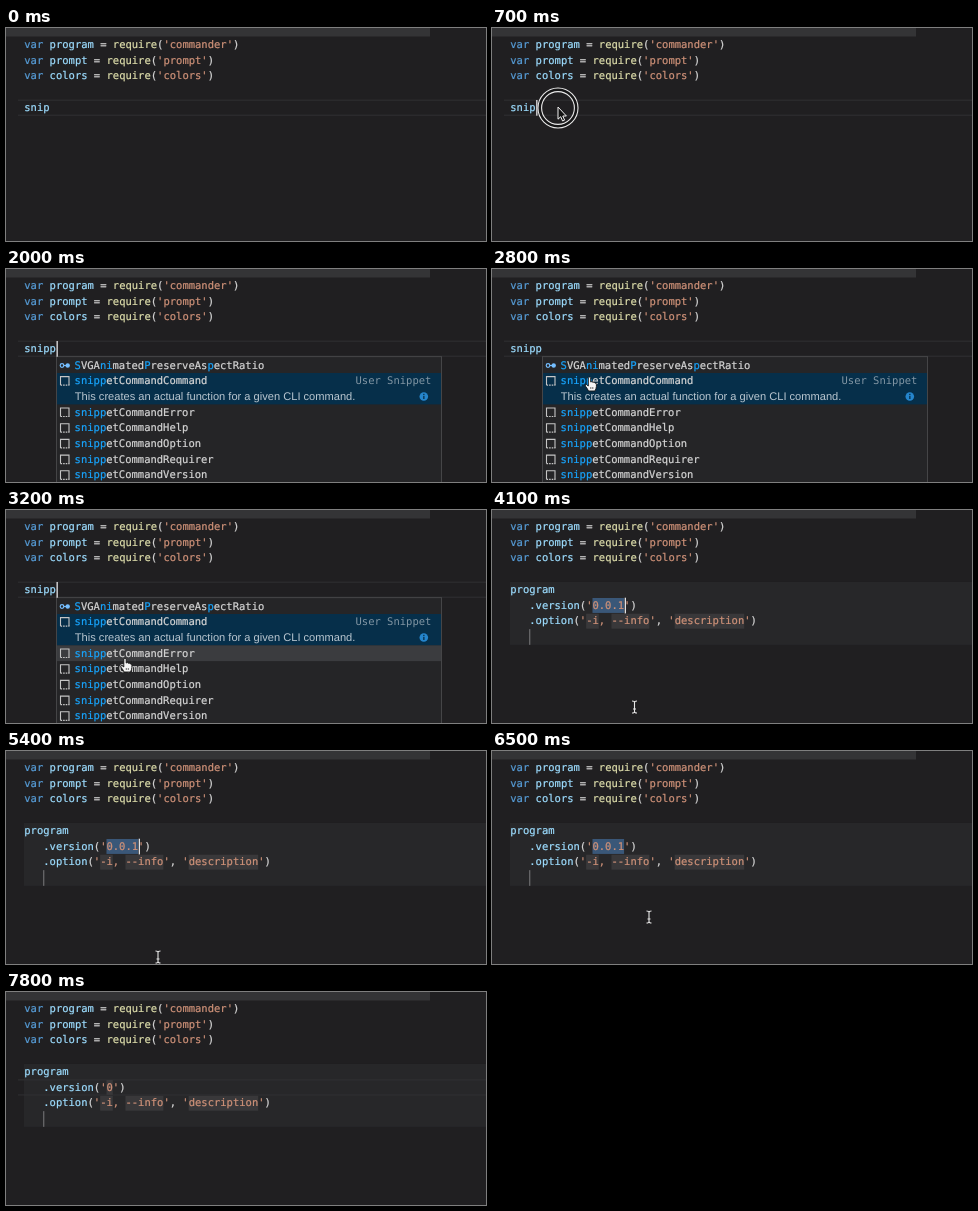
Recreate the animation shown at these times as an HTML page. Size 480 by 213 pixels, loop 8 s.

```html
<!DOCTYPE html>
<html lang="en">
<head>
<meta charset="utf-8">
<title>Snippet completion</title>
<style>
  html, body { margin: 0; width: 100%; height: 100%; overflow: hidden; background: #201f21; }
  svg { display: block; width: 480px; height: 213px; }
  text {
    font: 10.5px "DejaVu Sans Mono", monospace;
    white-space: pre;
    text-rendering: geometricPrecision;
    fill: #d4d4d4;
    stroke-width: .22px;
  }
  .detail { font: 11.1px "Liberation Sans", Arial, sans-serif; fill: #b9c6d0; }
  .muted { fill: #8296a4; }
  .kw { fill: #569cd6; stroke: #569cd6; }
  .id { fill: #9cdcfe; stroke: #9cdcfe; }
  .fn { fill: #dcdcaa; stroke: #dcdcaa; }
  .str { fill: #ce9178; stroke: #ce9178; }
  .pt { fill: #d4d4d4; stroke: #d4d4d4; }
  .hit { fill: #18a3fb; stroke: #18a3fb; }
</style>
</head>
<body>
<svg id="stage" viewBox="0 0 480 213"></svg>
<script>
const LOOP = 8000, STEP = 100;
const LEFT = 18.3, CHAR = 6.3215, TOP = 9.1, ROW = 15.72;
const stage = document.getElementById('stage');

function add(parent, tag, attrs = {}, content = '') {
  const node = document.createElementNS('http://www.w3.org/2000/svg', tag);
  for (const key in attrs) node.setAttribute(key, attrs[key]);
  node.textContent = content;
  parent.appendChild(node);
  return node;
}
const group = (parent = stage) => add(parent, 'g');
const rect = (parent, x, y, width, height, fill) =>
  add(parent, 'rect', { x, y, width, height, fill });
const show = (node, on) => node.setAttribute('visibility', on ? 'visible' : 'hidden');
const colX = col => LEFT + col * CHAR;
const rowY = row => TOP + row * ROW;

// Runs are [class, text] pairs set one after another on a single line.
function runs(parent, x, y, parts) {
  const line = add(parent, 'text', { x, y });
  for (const [kind, text] of parts) add(line, 'tspan', { class: kind }, text);
}
const code = (parent, row, col, parts) => runs(parent, colX(col), rowY(row) + 10.9, parts);

function currentLine(parent, row) {
  rect(parent, 12, rowY(row) - .3, 468, 1, '#303032');
  rect(parent, 12, rowY(row) + ROW - 1, 468, 1, '#303032');
}

// Window and code that never changes
rect(stage, 0, 0, 480, 213, '#201f21');
rect(stage, 0, 0, 424, 8.5, '#343436');

const requires = [['program', 'commander'], ['prompt', 'prompt'], ['colors', 'colors']];
requires.forEach(([name, lib], row) => code(stage, row, 0, [
  ['kw', 'var '], ['id', name], ['pt', ' = '], ['fn', 'require'],
  ['pt', '('], ['str', `'${lib}'`], ['pt', ')']
]));

// The word being typed
const typing = group();
currentLine(typing, 4);
code(typing, 4, 0, [['id', 'snip']]);
const extraP = group();
code(extraP, 4, 4, [['id', 'p']]);

// The inserted snippet
const snippet = group();
rect(snippet, 18, rowY(4), 462, ROW * 4, '#272729');
const mark = (parent, row, col, length, fill = '#39383a') =>
  rect(parent, colX(col), rowY(row) + .3, length * CHAR, ROW - .8, fill);
mark(snippet, 6, 12, 2);
mark(snippet, 6, 16, 6);
mark(snippet, 6, 26, 11);
code(snippet, 4, 0, [['id', 'program']]);
code(snippet, 6, 3, [
  ['id', '.option'], ['pt', '('], ['str', "'-i, --info'"], ['pt', ', '],
  ['str', "'description'"], ['pt', ')']
]);
rect(snippet, colX(3), rowY(7), 1, ROW, '#7b7b7d');

function versionLine(value, selected) {
  const g = group();
  if (!selected) currentLine(g, 5);
  mark(g, 5, 13, value.length, selected ? '#3a5778' : '#39383a');
  code(g, 5, 3, [['id', '.version'], ['pt', '('], ['str', `'${value}'`], ['pt', ')']]);
  return g;
}
const fullVersion = versionLine('0.0.1', true);
const newVersion = versionLine('0', false);

// Completion list
const popup = group();
const ITEM = 15.7, LIST = 87.6;
const itemY = slot => LIST + .7 + slot * ITEM;
add(popup, 'rect', { x: 50.5, y: LIST, width: 385, height: 140, fill: '#252527', stroke: '#454547' });
rect(popup, 51, itemY(1), 384, ITEM * 2, '#062f4a');
const hover = rect(popup, 51, 0, 384, ITEM, '#3b3c3f');

const label = (slot, parts) => runs(popup, 68.6, itemY(slot) + 11.2, parts);
label(0, [
  ['hit', 'S'], ['pt', 'VGA'], ['hit', 'ni'], ['pt', 'mated'], ['hit', 'P'],
  ['pt', 'reserveAs'], ['hit', 'p'], ['pt', 'ectRatio']
]);
add(popup, 'circle', { cx: 56, cy: 96.5, r: 1.8, fill: 'none', stroke: '#75beff', 'stroke-width': 1.2 });
add(popup, 'path', { d: 'M57.8 96.5H60', stroke: '#75beff', 'stroke-width': 1.2 });
add(popup, 'circle', { cx: 61.7, cy: 96.5, r: 2.2, fill: '#75beff' });

const commands = { 1: 'Command', 3: 'Error', 4: 'Help', 5: 'Option', 6: 'Requirer', 7: 'Version' };
for (const slot in commands) {
  const y = itemY(+slot) + 3.6;
  add(popup, 'path', {
    d: `M54.5 ${y + 8.5}V${y}H63V${y + 8.5}`, fill: 'none', stroke: '#c5c5c5', 'stroke-width': 1.1
  });
  add(popup, 'path', {
    d: `M54.5 ${y + 8.5}H63.5`, stroke: '#c5c5c5', 'stroke-width': 1.2, 'stroke-dasharray': '1.6 1'
  });
  label(+slot, [['hit', 'snipp'], ['pt', 'etCommand' + commands[slot]]]);
}
add(popup, 'text', { x: 349.5, y: itemY(1) + 11.2, class: 'muted' }, 'User Snippet');
add(popup, 'text', { x: 68.8, y: 131, class: 'detail' },
  'This creates an actual function for a given CLI command.');
add(popup, 'circle', { cx: 417.8, cy: 127.5, r: 4.3, fill: '#2585cc' });
rect(popup, 417.2, 126.8, 1.3, 3.2, '#062f4a');
rect(popup, 417.2, 124.8, 1.3, 1.2, '#062f4a');

const caret = rect(stage, 0, 0, 1.3, ROW, '#e4e4e6');

// Pointers, each drawn around its hot spot
const pointer = group();
const ring = group(pointer);
for (const [r, stroke, width] of [[18.2, '#151516', 3.6], [20, '#e8e8e8', 1.1], [16.4, '#e8e8e8', 1.1]])
  add(ring, 'circle', { r, fill: 'none', stroke, 'stroke-width': width });

const arrow = group(pointer);
add(arrow, 'path', {
  d: 'M0 -1V11.2L2.7 8.7L4.6 13L6.6 12.1L4.8 8H8.4Z',
  fill: '#111', stroke: '#f2f2f2', 'stroke-width': 1
});
const hand = group(pointer);
add(hand, 'path', {
  d: 'M-1.2 1Q0 -1 1.2 1V5Q2.6 4 3.4 5.3Q4.8 4.6 5.4 6Q7 5.8 6.9 7.6V9.5Q6.7 11.5 5.5 14H-1Q-2 11.5-4.2 9Q-4.6 7.4-3.2 7.4L-1.2 9Z',
  fill: '#f4f4f4', stroke: '#161616', 'stroke-width': .9
});
add(hand, 'path', { d: 'M1.3 10V12M3.3 10V12', stroke: '#333', 'stroke-width': .7 });
const beam = group(pointer);
add(beam, 'path', {
  d: 'M-2.5 -6Q0 -6 0 -4.5Q0 -6 2.5 -6M0 -4.5V4.5M-2.5 6Q0 6 0 4.5Q0 6 2.5 6M-1.5 2H1.5',
  fill: 'none', stroke: '#e6e6e6', 'stroke-width': 1.1
});

// Pointer stops: time, x, y
const path = [
  [100, 78, 106], [300, 66, 80], [2200, 66, 80], [2800, 97.5, 108], [3200, 119, 148],
  [3600, 142, 194], [4000, 142, 194], [4200, 143, 200], [5300, 143, 200], [5400, 152, 206],
  [5700, 188, 200], [6100, 157, 166]
];
function pointerAt(t) {
  const next = path.findIndex(stop => stop[0] > t);
  if (next === 0) return path[0].slice(1);
  if (next < 0) return path[path.length - 1].slice(1);
  const [t0, x0, y0] = path[next - 1], [t1, x1, y1] = path[next];
  const k = (t - t0) / (t1 - t0);
  return [x0 + (x1 - x0) * k, y0 + (y1 - y0) * k];
}

const within = (t, from, to) => t >= from && t < to;

// Caret stays on after each of these edits: time, column, row
const edits = [[700, 4, 4], [1900, 5, 4], [4000, 18, 5], [7300, 14, 5]];
function drawCaret(t) {
  const [start, col, row] = edits.filter(edit => edit[0] <= t).pop() || [200, 4, 4];
  show(caret, t >= start && Math.floor((t - start) / 500) % 2 === 0);
  caret.setAttribute('x', colX(col) + .6);
  caret.setAttribute('y', rowY(row));
}

function draw(t) {
  const open = within(t, 1900, 4000), inserted = t >= 4000;
  show(typing, !inserted);
  show(extraP, open);
  show(popup, open);
  show(snippet, inserted);
  show(fullVersion, within(t, 4000, 7300));
  show(newVersion, t >= 7300);
  drawCaret(t);

  const [x, y] = pointerAt(t);
  const onList = open && t >= 2200 && y > LIST;
  const slot = Math.floor((y - itemY(0) + 2) / ITEM);
  show(hover, onList && (slot === 0 || slot > 2));
  hover.setAttribute('y', itemY(slot));

  pointer.setAttribute('transform', `translate(${x.toFixed(2)} ${y.toFixed(2)})`);
  show(arrow, within(t, 100, 1900) || (within(t, 2200, 4000) && !onList));
  show(hand, onList);
  show(beam, within(t, 4000, 7300));
  show(ring, within(t, 600, 800) || within(t, 3800, 4000));
}

const begin = performance.now();
function tick() {
  const t = (performance.now() - begin) % LOOP;
  draw(Math.floor(t / STEP) * STEP);
  requestAnimationFrame(tick);
}
draw(0);
requestAnimationFrame(tick);
</script>
</body>
</html>
```
